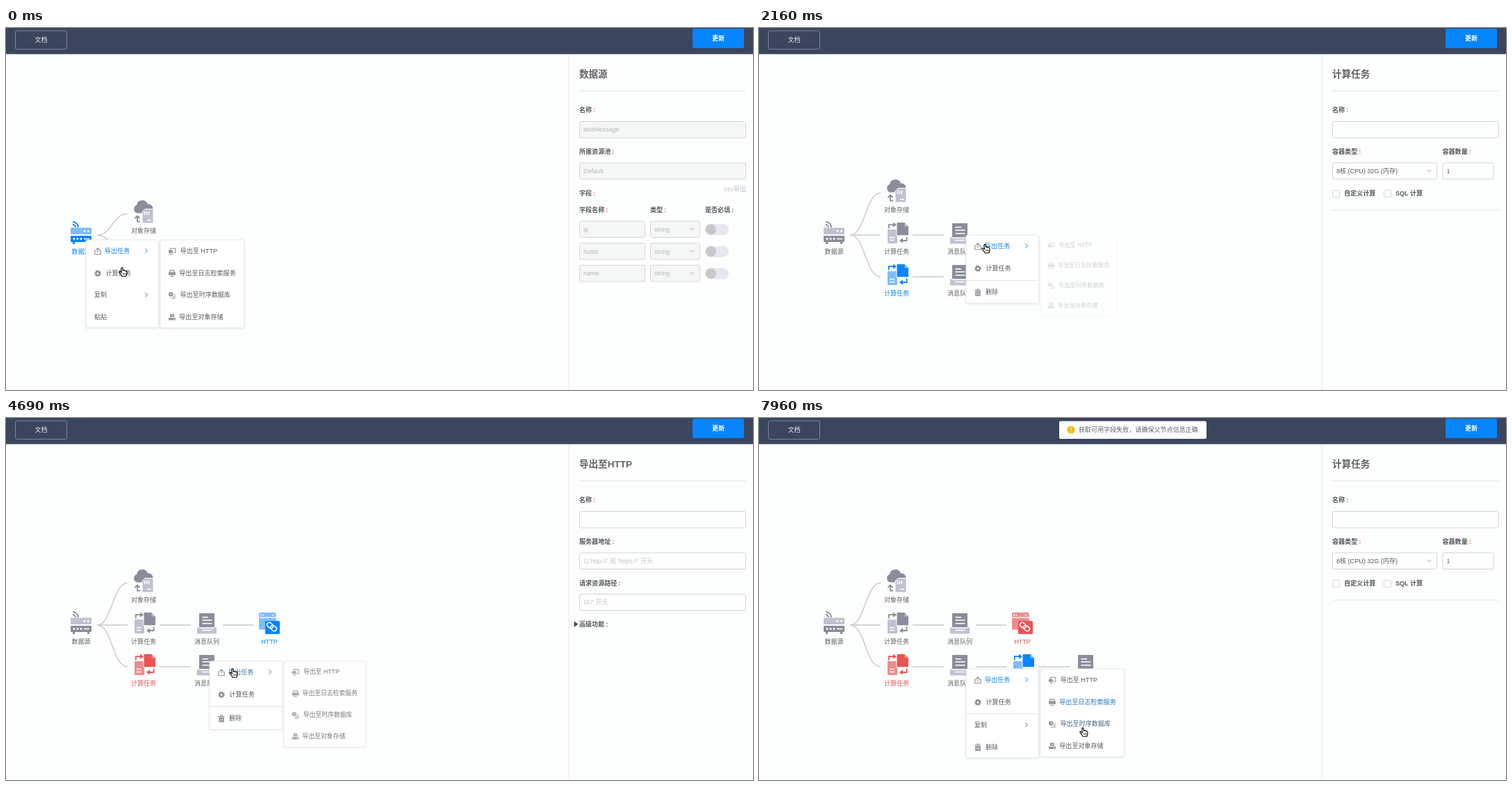
An HTML page that plays this animation: 1075x521 px, repeating every 8 s.

```html
<!DOCTYPE html>
<html lang="zh">
<head>
<meta charset="utf-8">
<title>Flow editor</title>
<style>
html, body { margin: 0; width: 100%; height: 100%; overflow: hidden; background: #fdfefe; }
svg { display: block; width: 1075px; height: 521px; }
text { font: 9.05px "Liberation Sans", "Noto Sans CJK SC", "Noto Sans CJK", sans-serif; fill: #606266; white-space: pre; }
.d { fill: var(--d); }
.l { fill: var(--l); }
.w { fill: #fff; }
.ds { fill: none; stroke: var(--d); stroke-width: 1.8; }
.ws { fill: none; stroke: #fff; stroke-width: 1.5; }
.edge { stroke: #fdfefe; }
.thin { stroke-width: .9; }
.node text { fill: var(--c); text-anchor: middle; }
.link { fill: none; stroke: #cbcbcb; stroke-width: 1.5; }
.box { fill: #fdfefe; stroke: #d4d5d8; }
.off { fill: #f5f6f6; stroke: #d4d5d8; }
.rule { stroke: #e4e5e7; }
.card { fill: #fff; stroke: #e8eaee; filter: drop-shadow(0 1px 1.5px rgba(0, 0, 0, .1)); }
.mi { fill: none; stroke: #8b8e94; stroke-width: 1.1; }
.mf { fill: #92959b; }
</style>
</head>
<body>
<svg id="stage" viewBox="0 0 1075 521"></svg>
<script>
const LOOP = 8000, FOREVER = 1e5;
const clamp = v => Math.max(0, Math.min(1, v));
const lerp = (a, b, k) => a + (b - a) * k;
const inOut = u => { u = clamp(u); return u < .5 ? 4 * u ** 3 : 1 - 4 * (1 - u) ** 3; };
const easeOut = u => 1 - (1 - clamp(u)) ** 2;
// Rises after `on`, falls after `off`.
const ramp = (t, [on, off], d) => clamp((t - on) / d) * (1 - clamp((t - off) / d));
const within = (t, a, b) => t >= a && t < b;
const mix = (a, b, k) => `rgb(${a.map((v, i) => Math.round(lerp(v, b[i], k)))})`;
const INK = [88, 91, 97], BLUE = [14, 135, 245];

// y is the middle of the line
const text = (x, y, s, o = {}) => {
  const size = o.size || 9.05;
  return `<text x="${x}" y="${y + size * .37}" ${o.id ? `id="${o.id}"` : ''} text-anchor="${o.anchor || 'start'}"
    style="font-size:${size}px;${o.fill ? `fill:${o.fill};` : ''}font-weight:${o.weight || 400}">${s}</text>`;
};
const rect = (cls, x, y, w, h, r = 0) => `<rect class="${cls}" x="${x}" y="${y}" width="${w}" height="${h}" rx="${r}"/>`;
const path = (cls, d) => `<path class="${cls}" d="${d}"/>`;
const dot = (cls, x, y, r) => `<circle class="${cls}" cx="${x}" cy="${y}" r="${r}"/>`;

/* ---- graph ---- */
const icons = {
  source: path('ds', 'M-12-15a4 4 0 0 1 4 4M-12-19a8 8 0 0 1 8 8') +
    rect('l', -15, -10.5, 30, 9.5, 1) + dot('w', 5, -5.8, 1.5) + dot('w', 10.5, -5.8, 1.5) +
    rect('d', -15, 1, 30, 9, 1) + [-10, -5, 0].map(x => dot('w', x, 5.5, 1.4)).join('') +
    path('ws', 'M4 5.5H12') + rect('d', -12, 10, 3, 3) + rect('d', 9, 10, 3, 3),
  storage: path('d', 'M-9-1a6 6 0 0 1-1-11.5a8.3 8.3 0 0 1 16-1.5a6.3 6.3 0 0 1 2 13Z') +
    path('l edge', 'M2-7H14V13.5H-2V-3Z') +
    path('ws', 'M1.5-3.5V1.5M4.5-3.5V1.5M7.5-3.5V1.5M5 9H11') +
    path('ds', 'M-5 11H-9V3.5M-12.5 6.5L-9 3-5.5 6.5'),
  compute: rect('l', -13, -8, 14, 20, 1) + path('ws', 'M-10 3.5H-3M-10 7.5H-3') +
    path('d edge', 'M0-18.5H11.5L17.5-12.5V.8H0Z') + path('l', 'M11.5-18V-12.5H17Z') +
    path('ds', 'M-11.2-9.5V-14.8H-4M14.6 2.5V8H8') +
    path('d', 'M-5-18.5L0-14.8-5-11ZM9 4.2L4 8 9 11.8Z'),
  queue: path('l', 'M-14 3.5H-11V1H11V3.5H14V12.5H-14Z') + rect('d', -11, -17, 22, 20.5, 1) +
    path('ws', 'M-6.5-11.3H2M-6.5-7H7.5M-6.5-2.3H7.5') + path('ws', 'M-11 4H11') + path('ws', 'M-7 7.5H7'),
  http: rect('l', -15, -18, 24.5, 24.5, 1.5) + path('ws', 'M-15-10.8H9.5') +
    [-12, -8.6, 5].map(x => dot('w', x, -14.4, 1.1)).join('') +
    rect('d', -6, -6, 21, 19, 1.5) +
    `<g transform="translate(3.5 2.5) rotate(40)">${rect('ws', -8, -3.2, 9.5, 6.4, 3.2) + rect('ws', -1.5, -3.2, 9.5, 6.4, 3.2)}</g>`
};
const tones = {
  gray: ['#898e9a', '#bfc2d0', '#606266'],
  blue: ['#0785ff', '#7fbcfa', '#0d86f5'],
  red: ['#ea5452', '#f08c8b', '#ea5452'],
  black: ['#000', '#8c8c8c', '#000']
};
// Children come first so that they slide out from behind their parents.
const nodes = [
  ['queue3', 'queue', '消息队列'], ['compute3', 'compute', '计算任务'], ['http', 'http', 'HTTP'],
  ['queue2', 'queue', '消息队列'], ['queue1', 'queue', '消息队列'], ['compute2', 'compute', '计算任务'],
  ['compute1', 'compute', '计算任务'], ['storage', 'storage', '对象存储'], ['source', 'source', '数据源']
];
const links = [['source', 'storage'], ['source', 'compute1'], ['source', 'compute2'], ['compute1', 'queue1'],
  ['compute2', 'queue2'], ['queue1', 'http'], ['queue2', 'compute3'], ['compute3', 'queue3']];

const graph = links.map(([, b]) => `<path class="link" id="to-${b}"/>`).join('') +
  nodes.map(([id, icon, label]) => `<g class="node" id="${id}">${icons[icon]}${text(0, 24, label)}</g>`).join('');

/* ---- side panel ---- */
const field = (x, y, w, s = '', cls = 'box', fill = '#55585e') =>
  rect(cls, x + .5, y - 11.5, w - 1, 23.5, 2) + text(x + 6, y, s, { fill });
const label = (x, y, s, must) => {
  const mark = `<tspan dx="2" style="${must ? 'fill:#e8504c' : ''}">:</tspan>`;
  return text(x, y, s + mark, { weight: 600, fill: '#55585e' });
};
const rule = y => `<path class="rule" d="M825 ${y}H1065"/>`;
const chevron = (x, y) => `<path d="M${x - 3} ${y - 1.5}l3 3 3-3" fill="none" stroke="#a4a7ad"/>`;
const head = s => text(825, 65.5, s, { size: 13.55, weight: 600 }) + rule(90.5) + label(825, 118, '名称', true);
const gray = '#b4b7bd';

const sourceRow = (name, i) => {
  const y = 289.5 + i * 31.7;
  return field(825, y, 95, name, 'off', gray) + field(927, y, 72, 'string', 'off', gray) + chevron(987.5, y) +
    `<rect x="1006" y="${y - 7.5}" width="34" height="16" rx="8" fill="#e7e7f1"/>` +
    `<circle cx="1014.5" cy="${y + .5}" r="7.6" fill="#c9c9c9"/>`;
};
const check = (x, s) => rect('box', x + .5, 233.5, 10, 10, 1) + text(x + 17, 238, s, { weight: 600, fill: '#55585e' });
const panels = {
  source: head('数据源') + field(825, 146, 240, 'testMessage', 'off', gray) +
    label(825, 178, '所属资源池') + field(825, 205.5, 240, 'Default', 'off', gray) +
    label(825, 237.5, '字段', true) + text(1065, 232, 'csv导出', { anchor: 'end', fill: '#b9bcca' }) +
    label(825, 261.5, '字段名称', true) + label(927, 261.5, '类型', true) + label(1006, 261.5, '是否必填') +
    ['ip', 'hosts', 'name'].map(sourceRow).join(''),
  compute: head('计算任务') + field(825, 146, 240) +
    label(825, 178, '容器类型', true) + label(983.5, 178, '容器数量', true) +
    field(825, 205.5, 151, '8核 (CPU) 32G (内存)') + chevron(964.5, 205.5) + field(983.5, 205.5, 74, '1') +
    check(825, '自定义计算') + check(899, 'SQL 计算') + rule(262),
  http: head('导出至HTTP') + field(825, 146, 240) +
    label(825, 178, '服务器地址', true) + field(825, 205.5, 240, "以'http://' 或 'https://' 开头", 'box', '#c3c6cc') +
    label(825, 237.5, '请求资源路径') + field(825, 265, 240, "以'/' 开头", 'box', '#c3c6cc') +
    '<path d="M817.5 292.5L823.5 296.7 817.5 301Z" fill="#4b4e54"/>' + label(825, 297, '高级功能')
};

/* ---- menus ---- */
const glyphs = {
  export: path('mi', 'M-2-1H-4.2V4.5H4.2V-1H2M0 2V-4M-2.3-2L0-4.4 2.3-2'),
  gear: '<circle r="2.6" class="mi" style="stroke-width:2.2"/><circle r="4.1" class="mi" style="stroke-width:1.5;stroke-dasharray:1.7 1.52"/>',
  trash: path('mi', 'M-4.8-3.2H4.8M-1.8-4.8H1.8') + path('mf', 'M-3.8-2H3.8V5H-3.8Z') + path('ws thin', 'M-1.3 0V3.2M1.3 0V3.2'),
  web: path('mi', 'M-2.5-1.5V-4H4.8V2H1.5') + rect('mf', -5, -1.5, 6, 4) + path('mi', 'M-3.5 4.2H.5'),
  log: path('mi', 'M-3-1V-4H3V-1') + path('mf', 'M-5-1.5H5V2.8H-5Z') + path('mi', 'M-2.5 4.5H2.5'),
  time: dot('mf', -1.8, -1.5, 3.2) + path('ws thin', 'M-1.8-3V-1.3H-.4') + path('mi', 'M2.5-.5H5M1 2H5M-1.5 4.3H5'),
  disk: rect('mf', -3, -4.5, 6, 4.5) + path('mf', 'M-5 1H5V4.5H-5Z') + path('ws thin', 'M-1-2.5H2M2 2.8H4')
};
const EXPORT = ['导出任务', 15.5, 27, 'export', true], COMPUTE = ['计算任务', 47.5, 28.5, 'gear'];
const subItems = [['导出至 HTTP', 15.5, 28.7, 'web'], ['导出至日志检索服务', 47.2, 27.3, 'log'],
  ['导出至时序数据库', 79, 28.5, 'time'], ['导出至对象存储', 110.3, 27.3, 'disk']];
// hover and subHover: item index -> [start, end]
const menus = [
  { x: 115, y: 305, h: 126, show: [-1, 650], sub: [-900, 80], hover: { 0: [-900, -30], 1: [90, FOREVER] }, subHover: {},
    items: [EXPORT, COMPUTE, ['复制', 79, 12, '', true], ['粘贴', 110.3, 12]] },
  { x: 298, y: 298, h: 98, show: [1870, 3150], sub: [2120, FOREVER], hover: { 0: [2000, FOREVER] }, subHover: { 0: [2860, FOREVER] },
    line: 65, items: [EXPORT, COMPUTE, ['删除', 82, 28, 'trash']] },
  { x: 293, y: 350, h: 98, show: [4400, 6180], sub: [4540, 5220], hover: { 0: [4580, 5300], 1: [5280, FOREVER] }, subHover: {},
    line: 65, items: [EXPORT, COMPUTE, ['删除', 82, 28, 'trash']] },
  { x: 298, y: 361, h: 128, show: [7080, FOREVER], sub: [7340, FOREVER], hover: { 0: [7200, FOREVER] },
    subHover: { 1: [7660, 7890], 2: [7910, FOREVER] },
    line: 64, items: [EXPORT, COMPUTE, ['复制', 80.5, 12, '', true], ['删除', 112.5, 28, 'trash']] }
];
const itemRow = id => ([s, y, x, glyph, more], i) =>
  (glyph ? `<g transform="translate(17 ${y + .7})">${glyphs[glyph]}</g>` : '') + text(x, y, s, { id: id + i }) +
  (more ? `<path id="${id}arrow${i}" d="M85.5 ${y - 3}l3 3-3 3" fill="none" stroke="#777"/>` : '');
const menuMarkup = (m, n) => `<g id="menu${n}" transform="translate(${m.x} ${m.y})">
  ${rect('card', 0, 0, 104.5, m.h, 2)}
  <rect id="lit${n}" x=".5" y="32" width="103.5" height="32.5" fill="#eef6fd"/>
  ${m.line ? `<path class="rule" d="M0 ${m.line + .5}H104.5"/>` : ''}${m.items.map(itemRow(`m${n}-`)).join('')}
  <g id="sub${n}">${rect('card', 0, 0, 120.5, 126.5, 2)}${subItems.map(itemRow(`s${n}-`)).join('')}</g></g>`;

/* ---- stage ---- */
const arrow = '<path d="M0 0V11L2.5 8.7 4.2 12.4 6.2 11.5 4.5 8H8Z" fill="#000" stroke="#fff" stroke-width=".9"/>';
const cursors = {
  arrow,
  ctx: arrow + '<rect x="6.5" y="5.5" width="8" height="7.5" fill="#fff" stroke="#000" stroke-width=".9"/><path d="M8 7.5H13M8 9.3H13M8 11.1H13" stroke="#000" stroke-width=".9"/>',
  hand: '<path d="M-1.2.8C-1.2-.5.9-.5 1 .8L1.3 4C2.2 3.4 3 3.6 3.3 4.3C4.2 3.8 5 4.2 5.2 4.9C6 4.6 6.9 5 6.9 6V8.5C6.8 10 6 10.5 6 12.3H0C-.6 10-3.5 8-4.2 6.3C-4.4 5.2-3 5-2.2 5.8L-.8 7Z" fill="#fff" stroke="#000" stroke-width="1.1"/><path d="M1.6 7.5V10M3.3 7.5V10M5 7.5V10" stroke="#000" stroke-width=".7"/>'
};
document.getElementById('stage').innerHTML = `
  <rect width="1075" height="521" fill="#fdfefe"/>
  ${graph}
  <rect x="810" y="38" width="265" height="483" fill="#fdfefe"/><path d="M810 38V521" stroke="#e6e7e9"/>
  ${Object.keys(panels).map(k => `<g id="panel-${k}">${panels[k]}</g>`).join('')}
  <rect width="1075" height="37.6" fill="#3b455d"/>
  <rect x="13.5" y="4" width="74" height="26.5" rx="2" fill="none" stroke="#7c8497"/>
  ${text(50.5, 17, '文档', { anchor: 'middle', fill: '#e6e8ee', weight: 500 })}
  <rect x="988" y="1" width="74" height="28" rx="2" fill="#0585ff"/>
  ${text(1025, 15, '更新', { anchor: 'middle', fill: '#fff', weight: 600 })}
  <g id="toast"><rect x="432" y="4.5" width="212" height="25.5" rx="2" fill="#fff"/>
    <circle cx="449" cy="17" r="5.6" fill="#f5b90f"/><path d="M449 13.7V18M449 19.2V20.5" stroke="#fff" stroke-width="1.1"/>
    ${text(460, 17, '获取可用字段失败，请确保父节点信息正确')}</g>
  ${menus.map(menuMarkup).join('')}
  <g id="cursor">${Object.keys(cursors).map(k => `<g id="cur-${k}">${cursors[k]}</g>`).join('')}</g>`;

const parts = {};
document.querySelectorAll('[id]').forEach(e => parts[e.id] = e);
const show = (id, on) => parts[id].style.display = on ? '' : 'none';
const move = (id, x, y, more = '') => parts[id].setAttribute('transform', `translate(${x} ${y})${more}`);

const pointer = [
  [0, 167, 345, 'hand'], [650, 167, 345, 'arrow'], [1150, 292, 359, 'ctx'], [1600, 292, 359, 'ctx'],
  [1850, 298, 298, 'ctx'], [2020, 322, 311, 'hand'], [2350, 330, 312, 'hand'], [2700, 428, 325, 'hand'],
  [3150, 428, 325, 'arrow'], [3350, 428, 325, 'arrow'], [3950, 293, 350, 'ctx'], [4420, 293, 350, 'ctx'],
  [4600, 326, 361, 'hand'], [5130, 326, 361, 'hand'], [5300, 342, 392, 'hand'], [5700, 353, 392, 'hand'],
  [6180, 353, 392, 'arrow'], [6700, 297, 359, 'ctx'], [7080, 297, 359, 'ctx'], [7230, 325, 371, 'hand'],
  [7420, 335, 372, 'hand'], [7650, 432, 384, 'hand'], [7800, 448, 406, 'hand'], [7940, 466, 446, 'hand']
];

function drawGraph(t) {
  const p1 = inOut((t - 660) / 750), p2 = inOut((t - 3130) / 750), p3 = inOut((t - 6170) / 750);
  const fade = p => clamp((p - .04) * 4);
  const hover2 = within(t, 1100, 1700) || within(t, 3900, 4500) || within(t, 6650, 7150);
  const row1 = lerp(328, 298, p1);
  const state = {
    source: [108, 298, t < 650 ? 'blue' : 'gray', 1],
    storage: [198, lerp(267.5, 237.5, p1), 'gray', 1],
    compute1: [198, row1, 'gray', 1],
    queue1: [289, row1, within(t, 1720, 1960) ? 'black' : 'gray', 1],
    compute2: [lerp(108, 198, p1), lerp(298, 358, p1), t < 3150 ? 'blue' : 'red', fade(p1)],
    queue2: [lerp(198, 289, p1), 358, hover2 ? 'black' : 'gray', fade(p1)],
    http: [lerp(289, 379, p2), 298, t < 6180 ? 'blue' : 'red', fade(p2)],
    compute3: [lerp(289, 379, p3), 358, 'blue', fade(p3)],
    queue3: [lerp(379, 470, p3), 358, 'gray', fade(p3)]
  };
  for (const id in state) {
    const [x, y, tone, alpha] = state[id], style = parts[id].style;
    move(id, x, y);
    style.opacity = alpha;
    ['--d', '--l', '--c'].forEach((v, i) => style.setProperty(v, tones[tone][i]));
  }
  const born = { compute2: 660, queue2: 660, http: 3130, compute3: 6170, queue3: 6170 };
  const grow = { queue2: p1, http: p2, compute3: p3, queue3: p3 };
  for (const [a, b] of links) {
    const [ax, ay] = state[a], [bx, by] = state[b], line = parts['to-' + b];
    show('to-' + b, t >= (born[b] || 0));
    if (a === 'source') {
      const x1 = ax + 23, x2 = Math.max(x1, bx - 23), mid = (x1 + x2) / 2;
      line.setAttribute('d', `M${x1} ${ay}C${mid} ${ay} ${mid} ${by} ${x2} ${by}`);
    } else {
      const x1 = ax + 19 + 4 * (grow[b] ?? 1);
      line.setAttribute('d', `M${x1} ${by}H${Math.max(ax + 30, bx - 23)}`);
    }
  }
}

function drawMenus(t) {
  menus.forEach((m, n) => {
    const open = within(t, ...m.show);
    show('menu' + n, open);
    if (!open) return;
    const tint = (id, span) => {
      const c = mix(INK, BLUE, span ? ramp(t, span, 200) : 0);
      parts[id].style.fill = c;
      return c;
    };
    m.items.forEach((item, i) => {
      const c = tint(`m${n}-${i}`, m.hover[i]);
      if (item[4]) parts[`m${n}-arrow${i}`].style.stroke = c;
    });
    subItems.forEach((_, i) => tint(`s${n}-${i}`, m.subHover[i]));
    parts['lit' + n].style.opacity = m.hover[1] ? ramp(t, m.hover[1], 150) : 0;
    const k = easeOut(ramp(t, m.sub, 280));
    show('sub' + n, k > 0);
    parts['sub' + n].style.opacity = k;
    move('sub' + n, 107, 0, ` scale(${.88 + .12 * k})`);
  });
}

function drawPointer(t) {
  let i = pointer.length - 1;
  while (pointer[i][0] > t) i--;
  const [t0, x, y, kind] = pointer[i], [t1, nx, ny] = pointer[i + 1] || [LOOP, x, y];
  const u = clamp((t - t0) / (t1 - t0)), k = u * u * (3 - 2 * u);
  move('cursor', lerp(x, nx, k), lerp(y, ny, k));
  Object.keys(cursors).forEach(c => show('cur-' + c, c === kind));
}

function render(t) {
  drawGraph(t);
  drawMenus(t);
  drawPointer(t);
  const panel = t < 650 ? 'source' : within(t, 3150, 6180) ? 'http' : 'compute';
  Object.keys(panels).forEach(k => show('panel-' + k, k === panel));
  const k = easeOut((t - 6380) / 350);
  parts.toast.style.opacity = k;
  move('toast', 0, -26 * (1 - k));
}

function tick() {
  render(performance.now() % LOOP);
  requestAnimationFrame(tick);
}
tick();
</script>
</body>
</html>
```
